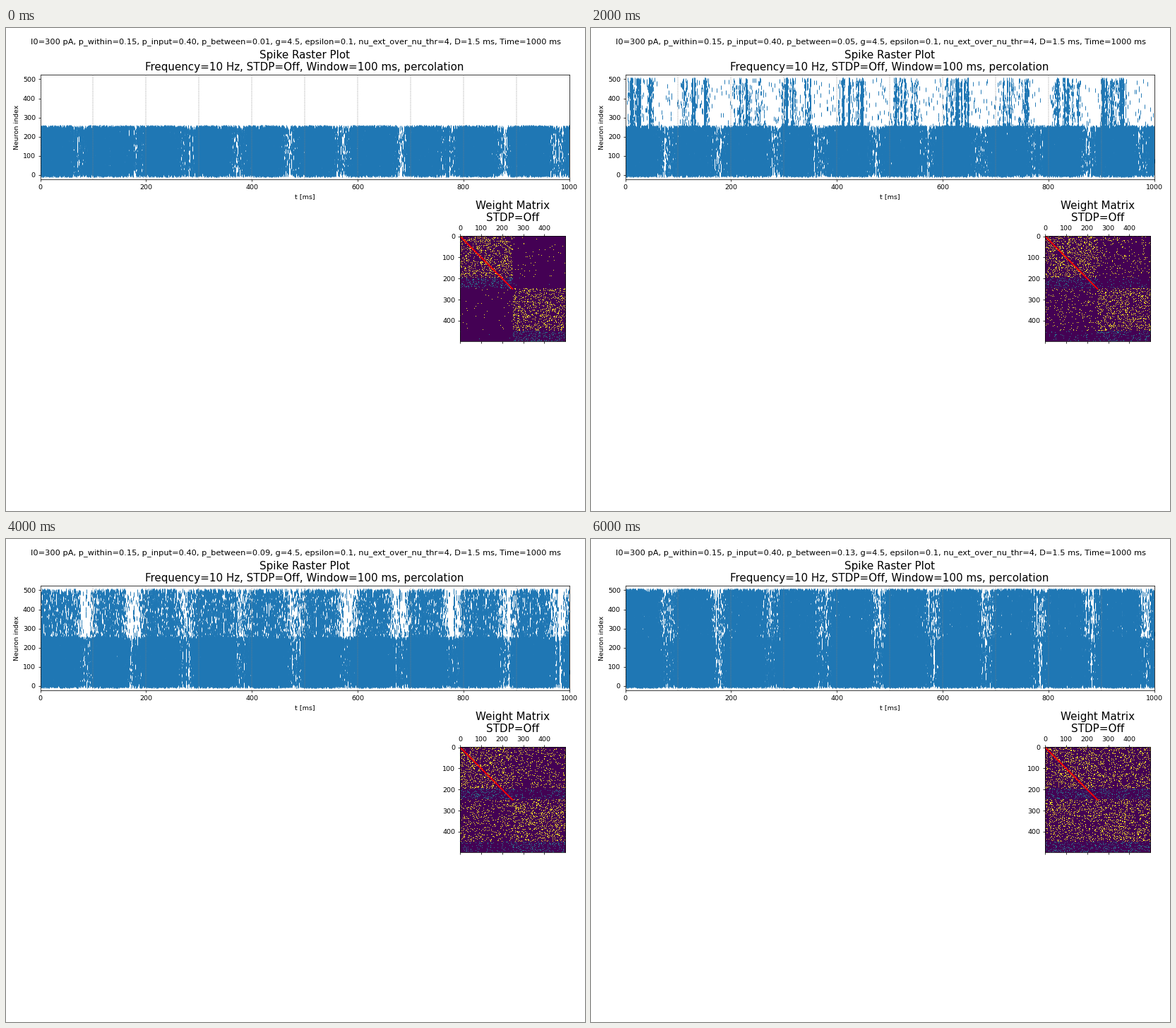
Write a matplotlib script that moves like this. It is 820 px wide and 683 px high and loops after 8 s.

```python
import numpy as np
import matplotlib.pyplot as plt
from matplotlib.animation import FuncAnimation

WIDTH, HEIGHT, DPI = 820, 683, 68.33
HALF, EXCITATORY, DURATION = 250, 200, 1000
MARK_AREA = 28  # neurons x ms hidden by one spike mark
P_WITHIN = 0.15
P_BETWEEN = (0.01, 0.05, 0.09, 0.13)
time = np.arange(DURATION)

# Quiet moments (ms) of the driven population, one row per panel.
QUIET = (
    (70, 180, 277, 373, 472, 570, 682, 770, 875, 978),
    (78, 178, 283, 365, 473, 570, 672, 777, 877, 978),
    (87, 175, 275, 380, 481, 580, 678, 779, 882, 981),
    (80, 177, 274, 374, 478, 581, 682, 781, 880, 985),
)
BURSTS = (14, 25, 47, 112, 128, 150, 215, 228, 250, 302, 315, 345, 408, 425, 445,
          512, 525, 545, 612, 628, 645, 715, 728, 755, 815, 833, 850, 905, 922, 940)
FADE = (1, 1, 0.5, 0.35, 0.7, 1, 1, 1.1, 0.9, 1)


def bumps(centres, width, heights=1):
    z = (time[:, None] - np.array(centres)) / width
    return (heights * np.exp(-z**2 / 2)).max(axis=1)


def spikes(rng, first, base, gain, profile, jitter):
    """Poisson spikes of one population; base is the mean ink depth."""
    noise = np.convolve(rng.normal(size=DURATION), (0.25, 0.5, 0.25), "same")
    depth = base * np.exp(gain * profile * (1 + 0.8 * noise) + jitter * noise)
    rate = np.minimum(depth, 16) / MARK_AREA
    neuron, t = np.nonzero(rng.poisson(rate, (HALF, DURATION)))
    return t + rng.random(t.size), neuron + first


def raster(i, rng):
    quiet = QUIET[i]
    groups = [spikes(rng, 0, (9, 9, 11, 12)[i], (-1.7, -1.7, -1.6, -1.6)[i],
                     bumps(quiet, 11), 0.25)]
    if i == 1:
        groups.append(spikes(rng, HALF, 0.05, 3.1, bumps(BURSTS, 6), 0.3))
    elif i == 2:
        groups.append(spikes(rng, HALF, 2.4, -3.2, bumps(quiet, 10, FADE), 0.5))
    elif i == 3:
        groups.append(spikes(rng, HALF, 7, -2.1, bumps(quiet, 11), 0.4))
    return np.hstack(groups)


def weights(p_between, rng):
    block = np.arange(2 * HALF) // HALF
    chance = np.where(block[:, None] == block, P_WITHIN, p_between)
    strength = np.where(np.arange(2 * HALF) % HALF < EXCITATORY, 1.0, 0.4)
    return (rng.random(chance.shape) < chance) * strength[:, None]


def add_axes(left, top, right, bottom):
    return fig.add_axes((left / WIDTH, 1 - bottom / HEIGHT,
                         (right - left) / WIDTH, (bottom - top) / HEIGHT))


plt.rcParams["font.family"] = "DejaVu Sans"
fig = plt.figure(figsize=((WIDTH + 0.01) / DPI, (HEIGHT + 0.01) / DPI), dpi=DPI,
                 facecolor="white")
heading = fig.suptitle("", fontsize=12)

ax = add_axes(48.5, 66, 797.5, 214.5)
marks, = ax.plot([], [], "|", color="#1f77b4")
for x in range(0, DURATION, 100):
    ax.axvline(x, color="grey", linestyle="--", linewidth=0.5, zorder=3)
ax.set(xlim=(0, DURATION), ylim=(-25, 524), xlabel="t [ms]", ylabel="Neuron index")
ax.set_title("Spike Raster Plot\n"
             "Frequency=10 Hz, STDP=Off, Window=100 ms, percolation", fontsize=16)

matrix_ax = add_axes(643, 294.5, 792, 443.5)
matrix = matrix_ax.matshow(np.zeros((2 * HALF, 2 * HALF)), cmap="viridis", vmin=0, vmax=1)
matrix_ax.plot([0, HALF - 1], [0, HALF - 1], color="red", linewidth=2)
matrix_ax.set(xlim=(-0.5, 499.5), ylim=(499.5, -0.5),
              xticks=range(0, 500, 100), yticks=range(0, 500, 100))
matrix_ax.set_title("Weight Matrix\nSTDP=Off", fontsize=16)


def update(i):
    rng = np.random.default_rng(10 + i)
    heading.set_text(
        f"I0=300 pA, p_within={P_WITHIN:.2f}, p_input=0.40, p_between={P_BETWEEN[i]:.2f}, "
        "g=4.5, epsilon=0.1, nu_ext_over_nu_thr=4, D=1.5 ms, Time=1000 ms")
    marks.set_data(*raster(i, rng))
    matrix.set_data(weights(P_BETWEEN[i], rng))
    return heading, marks, matrix


animation = FuncAnimation(fig, update, frames=len(P_BETWEEN), interval=2000,
                          repeat=True, repeat_delay=0)
plt.show()
```
